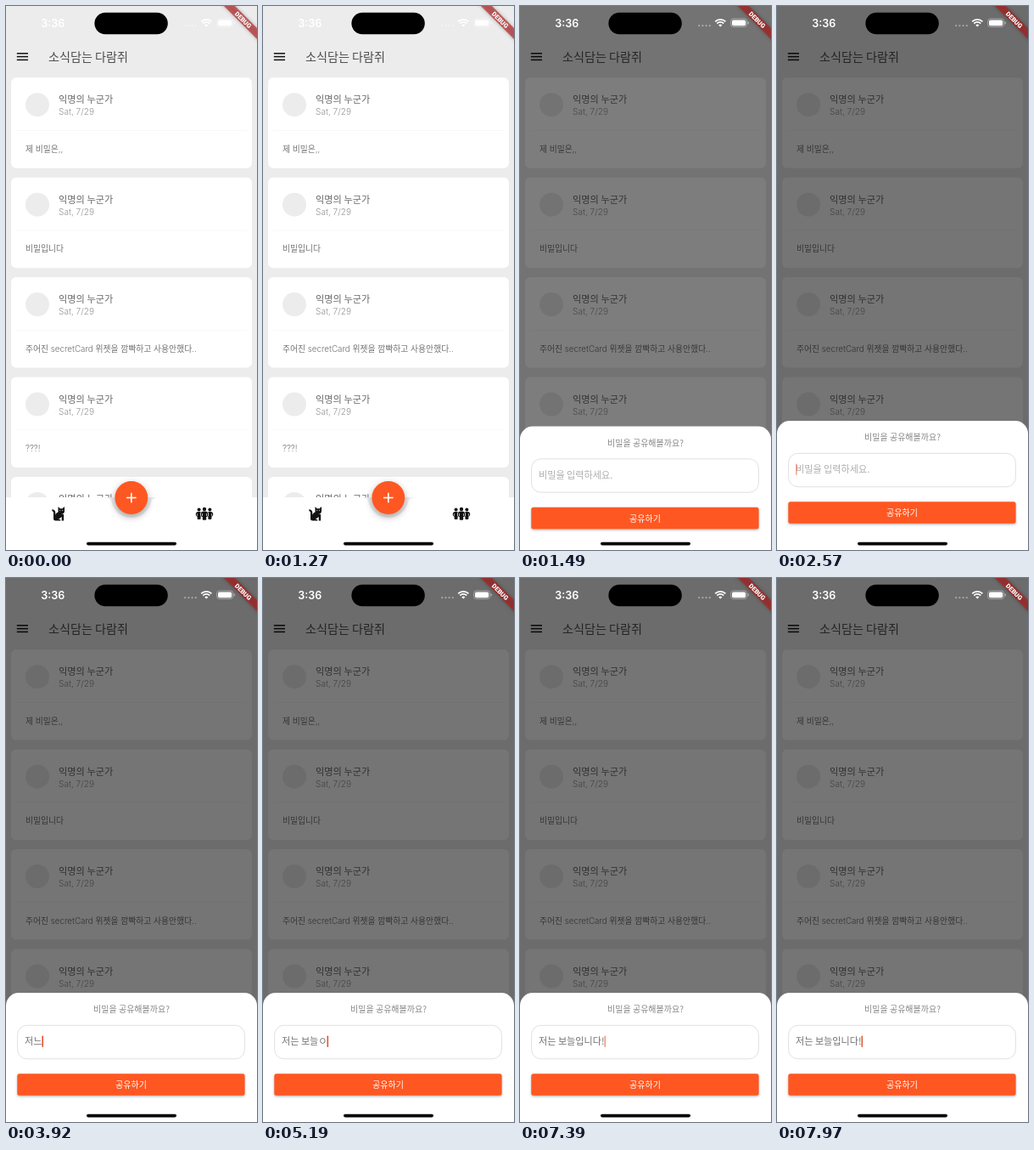
Animation, 296 px wide and 640 px high, one loop 8 s. Source, as an HTML page with a canvas:

```html
<!DOCTYPE html>
<html lang="ko">
<head>
<meta charset="utf-8">
<style>
html, body { margin: 0; width: 100%; height: 100%; overflow: hidden; background: #ececec; }
canvas { display: block; width: 296px; height: 640px; }
</style>
</head>
<body>
<canvas id="stage"></canvas>
<script>
const W = 296, H = 640, LOOP = 8000;
const ORANGE = '#ff5722', BG = '#ececec';
const FONT = '"Noto Sans CJK KR", "Noto Sans CJK", "Noto Sans CJK JP", sans-serif';
const LATIN = 'Inter, ' + FONT;
const canvas = document.getElementById('stage');
const c = canvas.getContext('2d');
const ratio = window.devicePixelRatio || 1;
canvas.width = W * ratio;
canvas.height = H * ratio;

const cards = ['제 비밀은,,', '비밀입니다', '주어진 secretCard 위젯을 깜빡하고 사용안했다..', '???!', ''];

// Each row: start time, then the values held until the next row.
const sheetSteps = [[0, H, 0], [1380, 536, 0.32], [1490, 494.5, 0.51], [1600, 488, 0.54]];
const typedSteps = [
  [0, ''], [3240, 'ㅈ'], [3460, '저'], [3800, '전'], [3920, '저느'], [4020, '저는'], [4230, '저는 '],
  [4450, '저는 ㅂ'], [4550, '저는 보'], [4660, '저는 본'], [4770, '저는 보느'], [4970, '저는 보늘'],
  [5190, '저는 보늘ㅇ'], [5290, '저는 보늘이'], [5520, '저는 보늘입'], [5630, '저는 보늘입ㄴ'],
  [5740, '저는 보늘입니'], [5970, '저는 보늘입닏'], [6190, '저는 보늘입니다'], [7060, '저는 보늘입니다!']
];
const caretSteps = [
  [0, 0], [1920, 0.5], [2020, 1], [2570, 0.5], [2680, 0], [3020, 0.5], [3130, 1],
  [6740, 0.5], [6850, 0], [6960, 0.5], [7060, 1],
  [7390, 0.6], [7500, 0.2], [7610, 0], [7860, 0.5], [7970, 0.95]
];

const at = (steps, t) => steps.findLast(s => s[0] <= t);

function box(x, y, w, h, r, fill) {
  c.beginPath();
  c.roundRect(x, y, w, h, r);
  c.fillStyle = fill;
  c.fill();
}

function disc(x, y, r, fill) {
  c.beginPath();
  c.arc(x, y, r, 0, Math.PI * 2);
  c.fillStyle = fill;
  c.fill();
}

// y is the middle of the Hangul line.
function text(str, x, y, size, fill, { weight = 300, align = 'left', family = FONT } = {}) {
  c.font = `${weight} ${size}px ${family}`;
  c.textAlign = align;
  c.textBaseline = 'alphabetic';
  c.fillStyle = fill;
  c.fillText(str, x, y + size * 0.37);
}

function shadow(color, blur, dy) {
  c.shadowColor = color;
  c.shadowBlur = blur * ratio;
  c.shadowOffsetY = dy * ratio;
}

function drawCard(y, body) {
  box(6, y, 284, 106.5, 6, '#fff');
  c.fillStyle = '#f6f6f6';
  c.fillRect(12, y + 62, 272, 0.8);
  disc(37, y + 32, 14, '#ececec');
  text('익명의 누군가', 62, y + 26, 11.2, '#686868');
  text('Sat, 7/29', 62, y + 40.5, 10.1, '#959595', { family: LATIN });
  text(body, 23, y + 84, 9.8, '#727272', { family: LATIN });
}

function drawCat(x, y) {
  c.save();
  c.translate(x, y);
  c.fillStyle = '#111';
  c.fill(new Path2D('M8 1 L10.3 3.2 H13 L15.5 1 V6.4 A3.8 3.8 0 0 1 8 6.4 Z'));
  c.fill(new Path2D('M4.8 10.5 Q6.5 7.2 9.5 7 Q11 9.7 14.6 10.2 V17.5 H12.2 V13 L8.3 16 H10 Q11 16.3 11 17.5 H5 Q2.5 17.5 2.5 15 V8 Q2.4 6.3 0.8 6 V4.2 Q4.6 4.3 4.8 8 Z'));
  disc(10.3, 5.3, 0.55, '#fff');
  disc(13.2, 5.3, 0.55, '#fff');
  c.restore();
}

function drawPerson(x, y, s) {
  c.save();
  c.translate(x, y);
  c.scale(s, s);
  box(-4.9, -3.6, 9.8, 8, 4, '#fff');
  disc(0, -5.6, 2.2, '#111');
  box(-4.2, -2.9, 8.4, 6.4, [3.4, 3.4, 2.6, 2.6], '#111');
  box(-2.2, 2, 4.4, 5.2, 1, '#111');
  c.fillStyle = '#fff';
  c.fillRect(-2.7, -0.4, 0.7, 3);
  c.fillRect(2, -0.4, 0.7, 3);
  c.restore();
}

function drawPeople(x, y) {
  drawPerson(x - 6.4, y, 0.9);
  drawPerson(x + 6.4, y, 0.9);
  drawPerson(x, y, 1);
}

function drawNav() {
  const cx = 147.8, top = 578, r = 24;
  c.fillStyle = BG;
  c.fillRect(0, top, W, H - top);
  c.save();
  c.beginPath();
  c.moveTo(0, top);
  c.lineTo(cx - r - 10, top);
  c.quadraticCurveTo(cx - r, top, cx - r + 0.7, top + 5);
  c.arc(cx, top, r, Math.PI - 0.21, 0.21, true);
  c.quadraticCurveTo(cx + r, top, cx + r + 10, top);
  c.lineTo(W, top);
  c.lineTo(W, H);
  c.lineTo(0, H);
  c.fillStyle = '#fff';
  c.fill();
  shadow('rgba(0,0,0,.32)', 8, 3);
  disc(cx, 578.5, 19.4, ORANGE);
  c.restore();
  c.fillStyle = '#fff';
  c.fillRect(cx - 5.8, 577.7, 11.6, 1.6);
  c.fillRect(cx - 0.8, 572.7, 1.6, 11.6);
  drawCat(53.5, 588);
  drawPeople(234, 597.5);
}

function drawPage() {
  c.fillStyle = BG;
  c.fillRect(0, 0, W, H);
  for (const y of [55.8, 59.6, 63.4]) {
    c.fillStyle = '#111';
    c.fillRect(12.8, y - 0.75, 13.2, 1.5);
  }
  text('소식담는 다람쥐', 50, 60, 14.1, '#4c4c4c');
  c.save();
  c.beginPath();
  c.rect(0, 76, W, 502);
  c.clip();
  cards.forEach((body, i) => drawCard(84.2 + i * 117.45, body));
  c.restore();
  drawNav();
}

function drawSheet(y, typed, caret) {
  box(0, y, W, H - y + 20, [15, 15, 0, 0], '#fff');
  text('비밀을 공유해볼까요?', 148, y + 19.3, 10, '#858585', { align: 'center' });
  c.beginPath();
  c.roundRect(13.6, y + 38.3, 267.8, 39.4, 11);
  c.strokeStyle = '#d8d8d8';
  c.lineWidth = 0.8;
  c.stroke();
  text(typed || '비밀을 입력하세요.', 22, y + 57.3, 11.1, typed ? '#707070' : '#adadad');
  if (caret) {
    const x = 22 + (typed ? c.measureText(typed).width : 0);
    c.globalAlpha = caret;
    box(x, y + 50.5, 1.6, 13.5, 0.8, '#e8502a');
    c.globalAlpha = 1;
  }
  c.save();
  shadow('rgba(0,0,0,.3)', 3, 1.2);
  box(13.3, y + 95.3, 268.3, 25.4, 2.5, ORANGE);
  c.restore();
  text('공유하기', 147.5, y + 108.3, 10, '#fff', { align: 'center', weight: 400 });
}

function drawStatus() {
  box(104.4, 7.8, 86.4, 25.4, 12.7, '#000');
  text('3:36', 55.2, 20, 12.6, '#fff', { weight: 600, align: 'center', family: 'Inter, sans-serif' });
  for (let i = 0; i < 4; i++) disc(211.2 + i * 4.2, 23.2, 1.1, 'rgba(255,255,255,.4)');
  c.strokeStyle = '#fff';
  c.lineWidth = 1.8;
  for (const r of [8.6, 5.6]) {
    c.beginPath();
    c.arc(236.3, 24.5, r, -Math.PI * 0.75, -Math.PI * 0.25);
    c.stroke();
  }
  c.beginPath();
  c.moveTo(236.3, 24.6);
  c.arc(236.3, 24.6, 3, -Math.PI * 0.75, -Math.PI * 0.25);
  c.fillStyle = '#fff';
  c.fill();
  c.beginPath();
  c.roundRect(248.6, 15, 19, 9.6, 3);
  c.strokeStyle = 'rgba(255,255,255,.45)';
  c.lineWidth = 0.8;
  c.stroke();
  box(250, 16.4, 16.2, 6.8, 1.8, '#fff');
  box(268.6, 18.2, 1.2, 3.2, [0, 1, 1, 0], 'rgba(255,255,255,.5)');
}

function drawBanner() {
  c.save();
  c.translate(W, 0);
  c.rotate(Math.PI / 4);
  shadow('rgba(0,0,0,.4)', 4, 0);
  c.fillStyle = 'rgba(183,28,28,.63)';
  c.fillRect(-32, 18.4, 64, 9.2);
  c.shadowColor = 'transparent';
  text('DEBUG', 0, 23, 7.5, '#fff', { weight: 900, align: 'center', family: 'Roboto, sans-serif' });
  c.restore();
}

function render(t) {
  c.setTransform(ratio, 0, 0, ratio, 0, 0);
  const [, y, dim] = at(sheetSteps, t);
  drawPage();
  if (dim) {
    c.fillStyle = `rgba(0,0,0,${dim})`;
    c.fillRect(0, 0, W, H);
    drawSheet(y, at(typedSteps, t)[1], at(caretSteps, t)[1]);
  }
  drawStatus();
  drawBanner();
  box(95, 630.8, 106, 3.6, 1.8, '#000');
}

const start = performance.now();
function tick() {
  render((performance.now() - start) % LOOP);
  requestAnimationFrame(tick);
}
tick();
</script>
</body>
</html>
```
